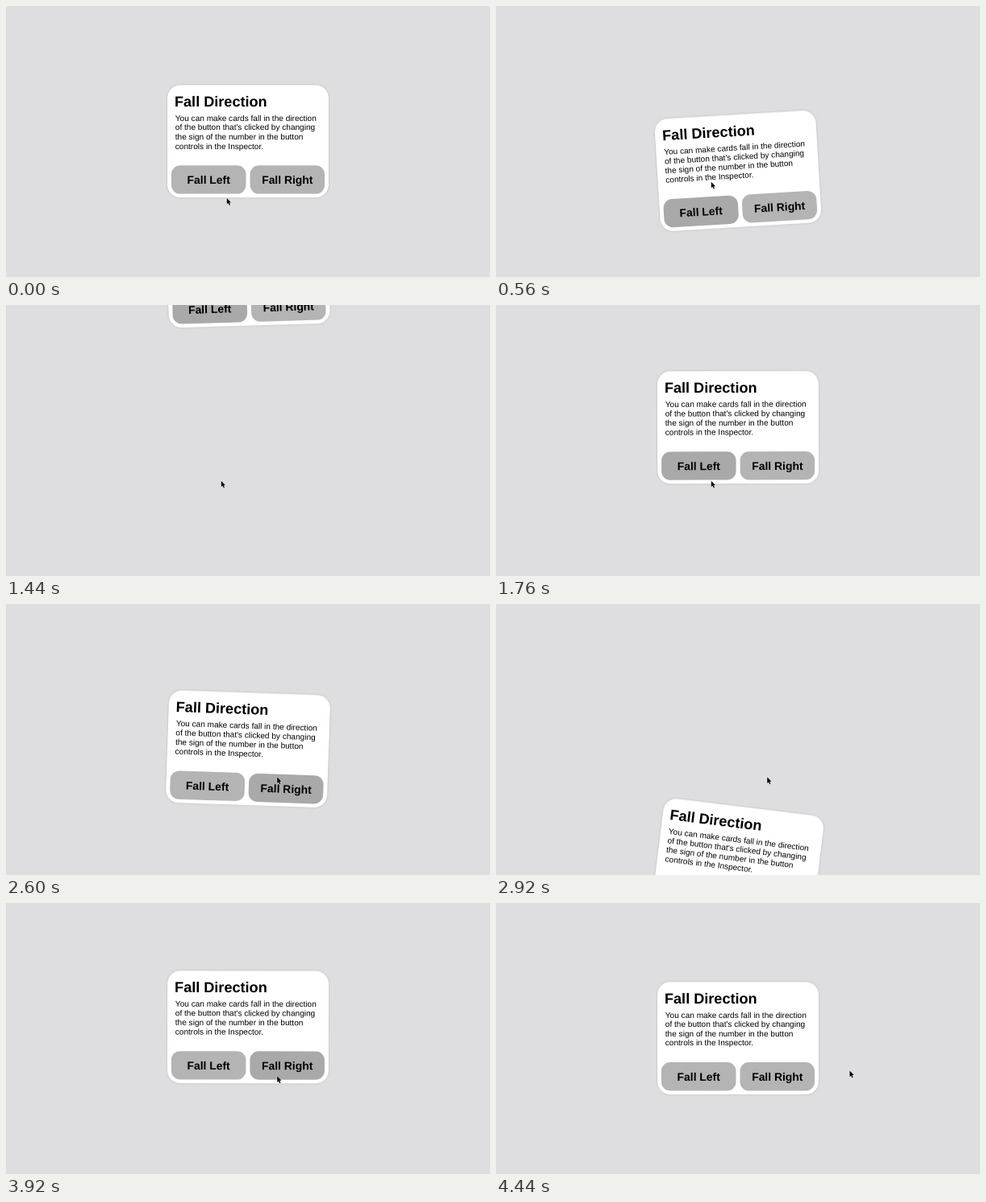
Recreate the animation shown at these times as an HTML page. Size 600 px wide and 337 px high, loop 4.48 s.

```html
<!DOCTYPE html>
<html lang="en">
<head>
<meta charset="utf-8">
<title>Fall Direction</title>
<style>
  html, body { margin: 0; width: 100%; height: 100%; overflow: hidden; background: #dedddf; }
  svg { display: block; width: 100%; height: 100%; }
  text { font-family: "Liberation Sans", Arial, sans-serif; text-rendering: geometricPrecision; }
  .title { font-size: 18.1px; font-weight: bold; }
  .body { font-size: 10.08px; }
  .label { font-size: 13.9px; font-weight: bold; text-anchor: middle; }
  .sheet { fill: #fff; filter: drop-shadow(0 .6px 1.1px rgba(0, 0, 0, .22)); }
</style>
</head>
<body>
<svg viewBox="0 0 600 337">
  <g id="card">
    <rect class="sheet" x="200" y="98.3" width="200" height="140" rx="16"/>
    <text class="title" x="209" y="125">Fall Direction</text>
    <g class="body">
      <text x="209.8" y="142.8">You can make cards fall in the direction</text>
      <text x="209.8" y="154.4">of the button that's clicked by changing</text>
      <text x="209.8" y="166">the sign of the number in the button</text>
      <text x="209.8" y="177.6">controls in the Inspector.</text>
    </g>
    <rect id="left" x="205" y="198.3" width="92.5" height="35.3" rx="11"/>
    <rect id="right" x="302.5" y="198.3" width="92.5" height="35.3" rx="11"/>
    <text class="label" x="251.2" y="221.2">Fall Left</text>
    <text class="label" x="348.8" y="221.2">Fall Right</text>
  </g>
  <path id="cursor" d="M0 0V7.6L1.7 6.1L3 8.9L4.2 8.3L3 5.5H5.3Z"
        stroke="#fff" stroke-width=".8" stroke-linejoin="round" paint-order="stroke"/>
</svg>
<script>
const LOOP = 4480;
const CENTER = { x: 300, y: 168.3 };
const GRAVITY = 0.00078;   // px per ms squared
const SPIN = 0.0158;       // degrees per ms while falling
const SETTLE = 124;        // decay time of the return, ms

// side: -1 tips left, 1 tips right; the card is `height` px above rest at `enter`
const falls = [
  { side: -1, start: 344, swap: 1300, enter: 1440, height: 214.2 },
  { side: 1, start: 2477, swap: 3400, enter: 3600, height: 186 }
];

const moves = [
  { from: 40, to: 250, x: 266.8, y: 218.7 },
  { from: 2080, to: 2400, x: 336.2, y: 215.3 },
  { from: 4100, to: 4440, x: 438.5, y: 208.6 }
];

const byId = id => document.getElementById(id);
const card = byId("card"), cursor = byId("cursor");
const left = byId("left"), right = byId("right");
const within = (t, a, b) => t >= a && t < b;
const shade = hovered => hovered ? "#a9a9a9" : "#b4b4b4";

function cardPose(t) {
  const fall = falls.filter(f => t >= f.start).pop();
  if (!fall) return { y: 0, angle: 0 };
  if (t < fall.swap) {
    const age = t - fall.start;
    return { y: GRAVITY * age * age, angle: fall.side * SPIN * age };
  }
  const above = fall.height * Math.exp((fall.enter - t) / SETTLE);
  return { y: -above, angle: fall.side * above * 0.008 };
}

function cursorPosition(t) {
  let x = 273.8, y = 239;
  for (const m of moves) {
    const p = Math.min(1, Math.max(0, (t - m.from) / (m.to - m.from)));
    const eased = p * p * (3 - 2 * p);
    x += (m.x - x) * eased;
    y += (m.y - y) * eased;
  }
  return { x, y };
}

function draw(now) {
  const t = now % LOOP;
  const { y, angle } = cardPose(t);
  card.setAttribute("transform", `translate(0 ${y}) rotate(${angle} ${CENTER.x} ${CENTER.y})`);
  left.setAttribute("fill", shade(within(t, 130, 2230)));
  right.setAttribute("fill", shade(within(t, 2240, 4270)));
  const tip = cursorPosition(t);
  cursor.setAttribute("transform", `translate(${tip.x} ${tip.y})`);
}

const begin = performance.now();
function tick() {
  draw(performance.now() - begin);
  requestAnimationFrame(tick);
}
tick();
</script>
</body>
</html>
```
